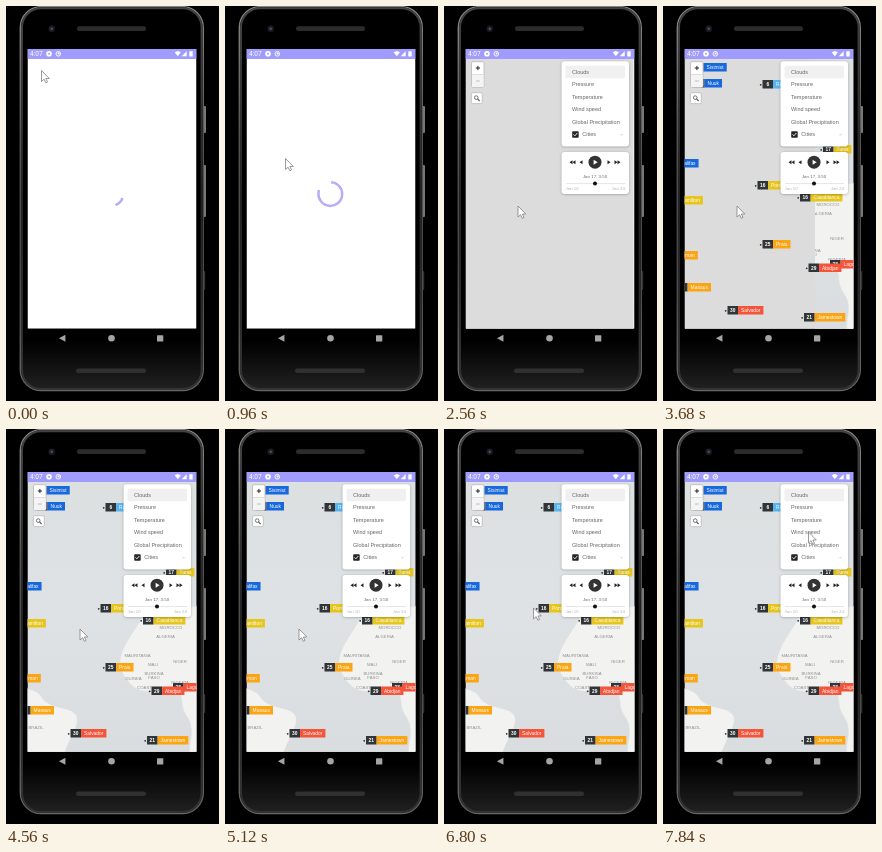
An HTML page with a canvas that plays this animation: 213 by 395 pixels, repeating every 7920 ms.

```html
<!DOCTYPE html>
<html lang="en">
<head>
<meta charset="utf-8">
<title>Weather map on a phone</title>
<style>
html, body { margin: 0; width: 100%; height: 100%; overflow: hidden; background: #000; }
canvas { display: block; width: 213px; height: 395px; }
</style>
</head>
<body>
<canvas id="stage"></canvas>
<script>
const W = 213, H = 395, LOOP = 7920;
const PAGE_AT = 2480, CITIES_AT = 3280, EAST_AT = 3520, WEST_AT = 4000;
const SCREEN = { x: 21.5, y: 43, w: 169, h: 279.7 };
const SANS = 'Roboto, "Open Sans", sans-serif';
const ARIAL = '"Liberation Sans", Arial, sans-serif';
const canvas = document.getElementById('stage');
const c = canvas.getContext('2d');
const dpr = window.devicePixelRatio || 1;
canvas.width = Math.round(W * dpr);
canvas.height = Math.round(H * dpr);

const clamp = v => Math.max(0, Math.min(1, v));
const ease = v => { v = clamp(v); return v * v * (3 - 2 * v); };

function rect(x, y, w, h, fill) {
  c.fillStyle = fill;
  c.fillRect(x, y, w, h);
}

function paint(fill, stroke, lw = 1) {
  if (fill) { c.fillStyle = fill; c.fill(); }
  if (stroke) { c.strokeStyle = stroke; c.lineWidth = lw; c.stroke(); }
}

function round(x, y, w, h, r, fill, stroke, lw) {
  c.beginPath();
  c.roundRect(x, y, w, h, r);
  paint(fill, stroke, lw);
}

function disc(x, y, r, fill, stroke, lw) {
  c.beginPath();
  c.arc(x, y, r, 0, 2 * Math.PI);
  paint(fill, stroke, lw);
}

function poly(pts, fill, stroke, lw) {
  c.beginPath();
  pts.forEach(([x, y]) => c.lineTo(x, y));
  c.closePath();
  paint(fill, stroke, lw);
}

// Triangle centred on x, y; dir 1 points right, -1 left.
function arrow(x, y, w, h, dir, fill) {
  const back = x - dir * w / 2;
  poly([[back, y - h / 2], [x + dir * w / 2, y], [back, y + h / 2]], fill);
}

function line(x1, y1, x2, y2, color, lw = 1) {
  c.beginPath();
  c.moveTo(x1, y1);
  c.lineTo(x2, y2);
  paint(null, color, lw);
}

function text(str, x, y, size, color, align = 'left', font = ARIAL, weight = 400) {
  c.font = `${weight} ${size}px ${font}`;
  c.textAlign = align;
  c.fillStyle = color;
  c.fillText(str, x, y);
}

function clip(x, y, w, h, draw) {
  c.save();
  c.beginPath();
  c.rect(x, y, w, h);
  c.clip();
  draw();
  c.restore();
}

function fade(y1, y2, ...colors) {
  const g = c.createLinearGradient(0, y1, 0, y2);
  colors.forEach((color, i) => g.addColorStop(i / (colors.length - 1), color));
  return g;
}

function phone() {
  rect(0, 0, W, H, '#000');
  round(197, 100, 3, 27, 1, '#777');
  round(197, 159, 3, 52, 1, '#777');
  round(197, 265, 2.2, 19, 1, '#333');
  round(14.3, 0.6, 183, 384, 21, fade(335, 385, '#000', '#222'),
    fade(0, 385, '#888', '#555', '#484848', '#666'), 1.4);
  round(16, 2.2, 179.6, 380.8, 19, null, fade(0, 385, '#444', '#222', '#333'), 2);
  round(71, 20.3, 69, 4.6, 2.2, '#2c2c2c');
  round(70, 362.4, 70, 4.6, 2.2, '#303030');
  disc(45.7, 22.8, 3.2, '#1b1c20');
  disc(45.7, 22.8, 1.2, '#4c5264');
  const grey = '#a5a5a5';
  arrow(56.2, 332.3, 6.5, 7, -1, grey);
  disc(105.5, 332.3, 3.3, grey);
  round(151, 329.2, 6.3, 6.3, 0.6, grey);
}

function statusBar() {
  const ink = '#fff', bar = '#a09cfd';
  rect(SCREEN.x, 43, SCREEN.w, 10, bar);
  text('4:07', 24, 50.2, 6.5, ink, 'left', SANS);
  disc(43, 47.8, 1.9, null, ink, 1.8);
  disc(52.3, 47.8, 2.3, null, ink, 0.9);
  disc(52.6, 47.6, 1, ink);
  poly([[168.7, 46.3], [171.8, 45], [174.9, 46.3], [171.8, 50.3]], ink);
  poly([[175.7, 50.3], [180.7, 50.3], [180.7, 45.2]], ink);
  round(183.3, 45.3, 3.4, 5.2, 0.5, ink);
}

// Standard material easing (0.4, 0, 0.2, 1).
function material(p) {
  p = clamp(p);
  let lo = 0, hi = 1;
  for (let i = 0; i < 20; i++) {
    const s = (lo + hi) / 2;
    const x = 1.2 * s * (1 - s) ** 2 + 0.6 * s * s * (1 - s) + s ** 3;
    if (x < p) lo = s; else hi = s;
  }
  return lo * lo * (3 - 2 * lo);
}

function spinner(t) {
  const f = (0.8 + t / 1333) % 1;
  const turn = 0.219 + 2 * t / 4444 + f / 4;
  const cap = 0.023;
  const tail = turn - cap + 0.75 * material(f * 2 - 1);
  const head = turn + cap + 0.75 * material(f * 2);
  c.beginPath();
  c.arc(105.3, 188, 11.9, tail * 2 * Math.PI, head * 2 * Math.PI);
  paint(null, '#b9adf5', 2.5);
}

// Web Mercator: longitude and latitude to stage pixels.
const project = ([lon, lat]) =>
  [154.5 + 2.36 * lon, 273.5 - 135.2 * Math.asinh(Math.tan(lat * Math.PI / 180))];

const AFRICA = [[25, 38], [-5, 37], [-10, 31], [-17, 21], [-17.5, 13], [-9, 3.5], [3, 7],
  [9, 4], [9, -3], [14, -10], [11, -24], [25, -24]];
const AMERICA = [[-75, 8], [-52, 6], [-49, -1], [-33, -4], [-39, -17], [-44, -28], [-75, -28]];
const COUNTRIES = [['MOROCCO', 165, 200], ['ALGERIA', 159.5, 208.5], ['MAURITANIA', 131.5, 228.3],
  ['MALI', 147, 237.3], ['NIGER', 174, 234.3], ['BURKINA', 148, 245.5], ['FASO', 148, 250.3],
  ['GUINEA', 127.5, 251], ['NIGERIA', 174, 254.5], ['COAST', 138.5, 259.5], ['BRAZIL', 30, 300]];

// Closed smooth coast through the midpoints of the key points.
function land(points) {
  const pts = points.map(project);
  c.beginPath();
  pts.forEach(([x, y], i) => {
    const [nx, ny] = pts[(i + 1) % pts.length];
    c.quadraticCurveTo(x, y, (x + nx) / 2, (y + ny) / 2);
  });
  c.closePath();
  paint('#f2f2f0', '#d6d9da', 0.4);
}

function tiles() {
  rect(22, 53, 168.5, 270, fade(53, 323, '#dde0e1', '#dfe2e4', '#d9dddf'));
  land(AFRICA);
  land(AMERICA);
  COUNTRIES.forEach(([name, x, y]) => text(name, x, y, 4.3, '#8d9193', 'center'));
}

const BLUE = '#1768dc', SKY = '#55b4ef', GOLD = '#e6c51d', AMBER = '#fba514', RED = '#f4543a';
// temperature, name, colour, tag left, tag top
const CITIES = [
  ['', 'Sisimiut', BLUE, 30, 57], ['', 'Nuuk', BLUE, 31, 73], ['6', 'Reykjavik', SKY, 99.5, 74],
  ['', 'Halifax', BLUE, 4, 153], ['17', 'Tunis', GOLD, 160, 139],
  ['16', 'Ponta Delgada', GOLD, 94.5, 175], ['', 'Hamilton', GOLD, 4, 190],
  ['16', 'Casablanca', GOLD, 137, 187], ['25', 'Praia', AMBER, 99.5, 234],
  ['', 'Cayman', AMBER, 0, 245], ['', 'Manaus', AMBER, 14, 277], ['28', 'Lagos', RED, 167, 254],
  ['29', 'Abidjan', RED, 145.5, 257.5], ['30', 'Salvador', RED, 64.5, 300],
  ['21', 'Jamestown', AMBER, 141, 307]
];

function city([temp, name, color, x, y]) {
  const badge = 10.6, size = 4.9;
  c.font = `${size}px ${ARIAL}`;
  const w = c.measureText(name).width + 6;
  disc(x - 1.8, y + 4.8, 0.9, '#303030');
  rect(x, y, badge, 8.5, '#323537');
  rect(x + badge, y, w, 8.5, color);
  text(temp, x + badge / 2, y + 6, size, '#fff', 'center', ARIAL, 700);
  text(name, x + badge + w / 2, y + 6, size, '#fff', 'center');
}

function card(y, h) {
  c.save();
  c.shadowColor = 'rgba(0,0,0,.3)';
  c.shadowBlur = 2.5 * dpr;
  c.shadowOffsetY = 0.5 * dpr;
  round(117.5, y, 67.5, h, 3, '#fff');
  c.restore();
}

function zoomControls() {
  const edge = '#c2c2c2';
  round(27.5, 55.7, 12.5, 25.6, 1.5, '#fff', edge);
  rect(28, 68.5, 11.5, 12.3, '#f4f4f4');
  line(28, 68.5, 39.5, 68.5, '#ccc', 0.6);
  line(31.8, 62, 36, 62, '#222');
  line(33.9, 59.9, 33.9, 64.1, '#222');
  line(32, 75, 35.8, 75, '#bbb');
  round(27.3, 86.7, 11, 11, 1.5, '#fff', edge);
  disc(32.2, 91.6, 1.8, null, '#555', 0.8);
  line(33.5, 92.9, 35.6, 95, '#555', 1.1);
}

function layerCard() {
  card(55.3, 85.2);
  round(121.5, 59.8, 59.5, 12.5, 1.5, '#f0f0f0');
  ['Clouds', 'Pressure', 'Temperature', 'Wind speed', 'Global Precipitation', 'Cities'].forEach(
    (name, i) => text(name, i < 5 ? 128 : 138.3, 67.7 + i * 12.5, 5.5, '#666'));
  round(128.2, 125.2, 6.5, 6.5, 0.8, '#262626');
  line(129.5, 128.4, 130.9, 129.8, '#fff', 0.9);
  line(130.9, 129.8, 133.3, 127, '#fff', 0.9);
  line(176.5, 128.8, 178.5, 128.8, '#bbb', 0.7);
}

function playerCard() {
  const x = 151, y = 156.2;
  card(146, 42);
  for (const dir of [-1, 1])
    for (const gap of [14, 21, 24]) arrow(x + dir * gap, y, 3, 4, dir, '#222');
  disc(x, y, 6.5, '#333');
  arrow(x + 0.6, y, 4, 5, 1, '#fff');
  text('Jan 17, 3:50', x, 171.8, 4.4, '#666', 'center');
  line(122, 177.6, 181, 177.6, '#ddd', 0.8);
  disc(x, 177.5, 2, '#111');
  text('Jan 10', 121.5, 184.3, 4.4, '#b5b5b5');
  text('Jan 24', 181, 184.3, 4.4, '#b5b5b5', 'right');
}

function mapPage(t) {
  rect(22, 53, 167.5, 270, '#dcdcdc');
  if (t >= WEST_AT) tiles();
  else if (t >= EAST_AT) clip(152, 53, 39, 270, tiles);
  if (t >= CITIES_AT) CITIES.forEach(city);
  zoomControls();
  layerCard();
  playerCard();
}

function pointer(t) {
  const a = ease((t - 300) / 1100), b = ease((t - 6500) / 1000);
  const x = 35.5 + 38.5 * a + 71.5 * b;
  const y = 64.5 + 135.5 * a - 97 * b;
  const shape = [[0, 0], [0, 11], [2.6, 8.7], [4.3, 12.3], [6, 11.5], [4.4, 8], [7.8, 8]];
  poly(shape.map(([dx, dy]) => [x + dx, y + dy]), '#fff', '#808080', 0.8);
}

function draw(t) {
  c.setTransform(dpr, 0, 0, dpr, 0, 0);
  phone();
  clip(SCREEN.x, SCREEN.y, SCREEN.w, SCREEN.h, () => {
    rect(SCREEN.x, SCREEN.y, SCREEN.w, SCREEN.h, '#fff');
    if (t >= PAGE_AT) mapPage(t); else spinner(t);
    statusBar();
    pointer(t);
  });
}

const start = performance.now();
function tick() {
  draw((performance.now() - start) % LOOP);
  requestAnimationFrame(tick);
}
tick();
</script>
</body>
</html>
```
